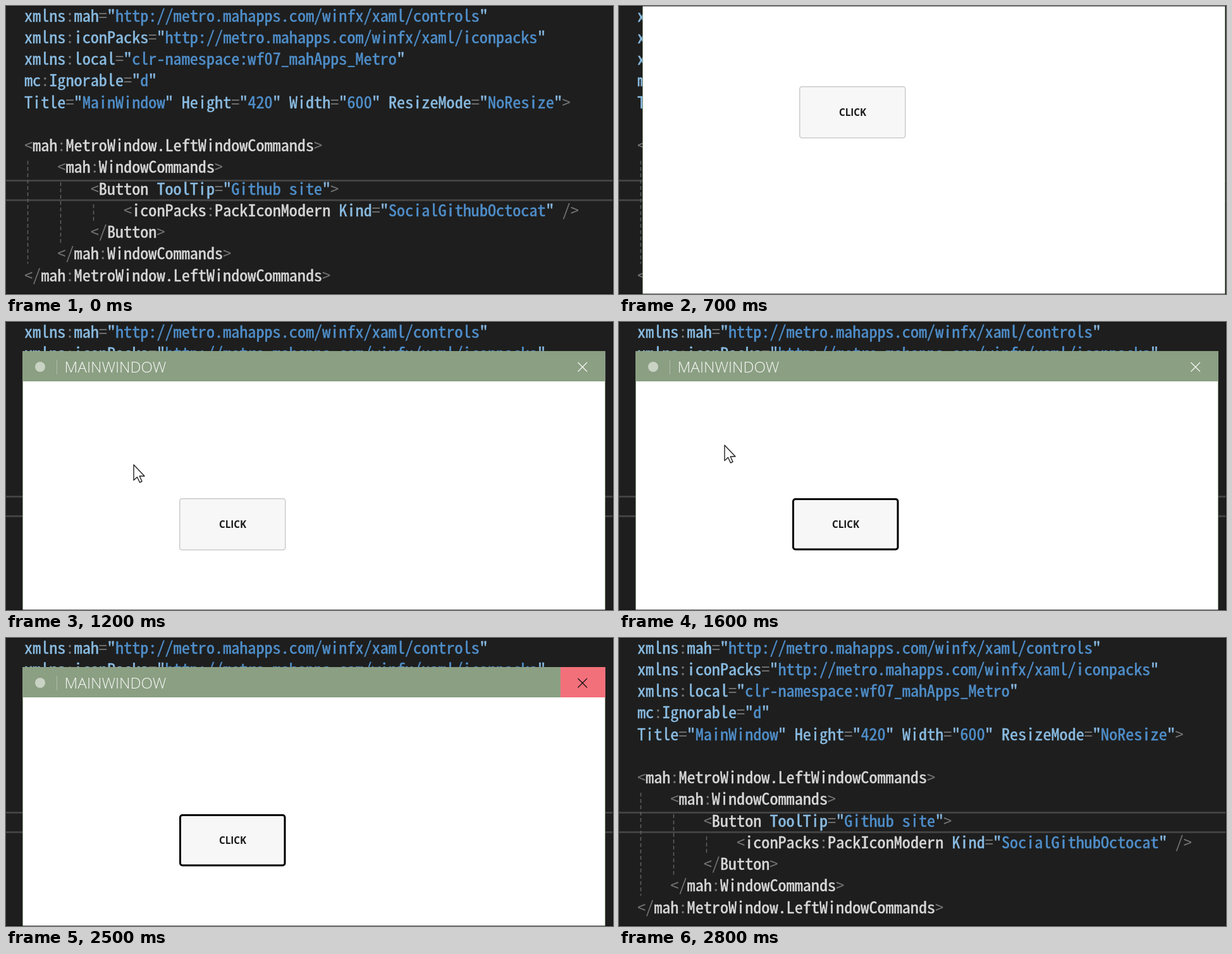
Recreate the animation shown at these times as an HTML page with a canvas. Size 960x456 px, loop 2900 ms.

```html
<!DOCTYPE html>
<html lang="en">
<head>
<meta charset="utf-8">
<title>Window commands</title>
<style>
  html, body { margin: 0; width: 100%; height: 100%; overflow: hidden; background: #1e1e1e; }
  canvas { display: block; }
</style>
</head>
<body>
<canvas id="stage" width="960" height="456"></canvas>
<script>
const ctx = document.getElementById('stage').getContext('2d');
const LOOP = 2900, STEP = 100;
const ADVANCE = 13.09, LINE = 34.25, LEFT = 29, BASELINE = 24.6;
const MONO = '"Noto Sans Mono CJK KR", "Noto Sans Mono CJK JP", "Noto Sans Mono", monospace';
const SANS = '"Open Sans", "Noto Sans", sans-serif';
const COLOR = { value: '#4f8fcb', quote: '#86b6de', mark: '#757575', tag: '#d8d8d8', attr: '#8abce2' };

const source = `xmlns:mah="http://metro.mahapps.com/winfx/xaml/controls"
xmlns:iconPacks="http://metro.mahapps.com/winfx/xaml/iconpacks"
xmlns:local="clr-namespace:wf07_mahApps_Metro"
mc:Ignorable="d"
Title="MainWindow" Height="420" Width="600" ResizeMode="NoResize">

<mah:MetroWindow.LeftWindowCommands>
    <mah:WindowCommands>
        <Button ToolTip="Github site">
            <iconPacks:PackIconModern Kind="SocialGithubOctocat" />
        </Button>
    </mah:WindowCommands>
</mah:MetroWindow.LeftWindowCommands>`.split('\n');

// Choose the size that gives the monospaced font the editor's column width.
ctx.font = `100px ${MONO}`;
const codeFont = `${100 * ADVANCE / ctx.measureText('0').width}px ${MONO}`;

// Key points: time, x, y
const windowPath = [[600, 335, -156], [700, 37, -106], [1000, 26, 46]];
const cursorPath = [[600, 499, -132], [700, 201, -82], [1000, 190, 70], [1200, 202, 226],
  [1300, 286, 306], [1400, 290, 310], [1600, 167, 195], [1800, 160, 188],
  [2000, 56, 72], [2100, 56, 72], [2400, 905, 72]];

function along(path, t) {
  const next = path.findIndex(p => p[0] > t);
  if (next < 0) return path[path.length - 1].slice(1);
  if (next === 0) return path[0].slice(1);
  const a = path[next - 1], b = path[next], k = (t - a[0]) / (b[0] - a[0]);
  return [a[1] + (b[1] - a[1]) * k, a[2] + (b[2] - a[2]) * k];
}

function rect(x, y, w, h, color) {
  ctx.fillStyle = color;
  ctx.fillRect(x, y, w, h);
}

function line(x1, y1, x2, y2, color, width = 1) {
  ctx.strokeStyle = color;
  ctx.lineWidth = width;
  ctx.beginPath();
  ctx.moveTo(x1, y1);
  ctx.lineTo(x2, y2);
  ctx.stroke();
}

function text(str, x, y, color, weight = 0) {
  ctx.fillStyle = ctx.strokeStyle = color;
  ctx.fillText(str, x, y);
  if (!weight) return;
  ctx.lineWidth = weight;
  ctx.strokeText(str, x, y);
}

function drawCodeLine(code, row) {
  const put = (str, column, color) =>
    text(str, LEFT + column * ADVANCE, BASELINE + row * LINE, color, color === COLOR.mark ? 0 : 0.5);
  let inTag = false;
  for (const { 0: token, index } of code.matchAll(/"[^"]*"|[<>\/=:]|\s+|[^"<>\/=:\s]+/g)) {
    if (token === '<') inTag = true;
    if (token[0] === ' ') {
      inTag = false;
    } else if (token[0] === '"') {
      put('"', index, COLOR.quote);
      put(token.slice(1, -1), index + 1, COLOR.value);
      put('"', index + token.length - 1, COLOR.quote);
    } else {
      put(token, index, /[<>\/=:]/.test(token) ? COLOR.mark : inTag ? COLOR.tag : COLOR.attr);
    }
  }
}

function drawEditor() {
  rect(0, 0, 960, 456, '#1e1e1e');
  rect(0, 275, 960, 3, '#424242');
  rect(0, 306, 960, 3, '#424242');
  ctx.setLineDash([6, 4]);
  line(34.5, 245, 34.5, 408, '#606060', 1.5);
  line(86.5, 279, 86.5, 376, '#606060', 1.5);
  line(138.5, 314, 138.5, 342, '#606060', 1.5);
  ctx.setLineDash([]);
  ctx.font = codeFont;
  ctx.textAlign = 'left';
  ctx.lineJoin = 'round';
  source.forEach(drawCodeLine);
}

function drawButton(focused) {
  const border = focused ? 3 : 1.5;
  ctx.beginPath();
  ctx.roundRect(248 + border / 2, 233 + border / 2, 168.5 - border, 82.5 - border, 3.5);
  ctx.fillStyle = '#f7f7f7';
  ctx.fill();
  ctx.strokeStyle = focused ? '#000' : '#cbcbcb';
  ctx.lineWidth = border;
  ctx.stroke();
  ctx.font = `bold 15.2px ${SANS}`;
  ctx.textAlign = 'center';
  text('CLICK', 332.5, 280, '#1a1a1a');
}

function drawWindow(x, y, focused, closeHover) {
  ctx.save();
  ctx.translate(x, y);
  rect(0, 0, 922, 645, '#8b9f83');
  rect(1, 48, 920, 596, '#fff');
  ctx.beginPath();
  ctx.arc(28, 25, 8, 0, 2 * Math.PI);
  ctx.fillStyle = '#c9d3c4';
  ctx.fill();
  line(54.5, 14, 54.5, 37, '#b0beaa');
  ctx.font = `300 24.2px ${SANS}`;
  ctx.textAlign = 'left';
  text('MAINWINDOW', 66.5, 34, '#f6f8f5');
  if (closeHover) rect(851, 0, 71, 48, '#f2707a');
  const cross = closeHover ? '#111' : '#f6f8f5';
  line(878.5, 18, 893, 32.5, cross, 1.3);
  line(893, 18, 878.5, 32.5, cross, 1.3);
  drawButton(focused);
  ctx.restore();
}

function drawCursor(x, y) {
  ctx.save();
  ctx.translate(x, y);
  const arrow = new Path2D('M0 0V24.5L5.5 19.5L9.5 28L13 26.3L9.2 18H17Z');
  ctx.fillStyle = '#fff';
  ctx.fill(arrow);
  ctx.strokeStyle = '#222';
  ctx.lineWidth = 1.4;
  ctx.stroke(arrow);
  ctx.restore();
}

function draw(now) {
  const t = Math.floor(now % LOOP / STEP) * STEP;
  drawEditor();
  if (t >= 600 && t < 2600) {
    const [x, y] = along(windowPath, t);
    const [cx, cy] = along(cursorPath, t);
    drawWindow(x, y, t >= 1400, t > 2000 && cx >= 877);
    if (t < 2500) drawCursor(cx, cy);
  }
  const edge = 'rgba(0, 0, 0, .5)';
  rect(0, 0, 960, 1, edge);
  rect(959, 1, 1, 455, edge);
  rect(0, 455, 959, 1, edge);
}

const start = performance.now();
function tick() {
  draw(performance.now() - start);
  requestAnimationFrame(tick);
}
tick();
</script>
</body>
</html>
```
